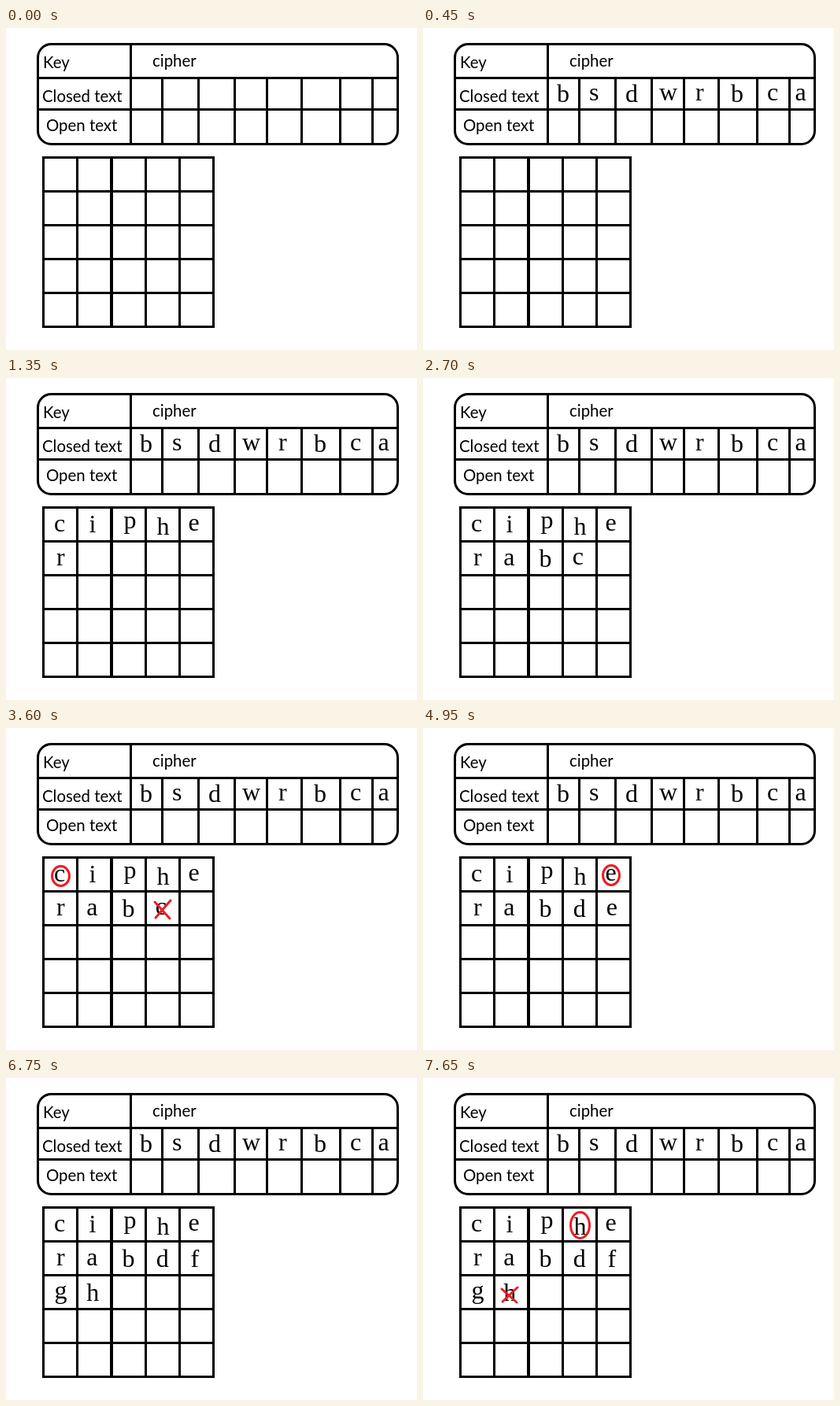
An HTML page for the animation above (8 s loop, 522 px wide and 409 px high).

```html
<!DOCTYPE html>
<html lang="en">
<head>
<meta charset="utf-8">
<title>Cipher square</title>
<style>
  html, body { margin: 0; width: 100%; height: 100%; overflow: hidden; background: #fff; }
  svg { display: block; }
  .lines { fill: none; stroke: #000; stroke-width: 3; }
  .label { font: 20.4px Lato, sans-serif; }
  .letter { font: 32px "Liberation Serif", serif; }
  .mark { fill: none; stroke: #ed1c24; stroke-width: 3; stroke-linecap: round; }
  .halo { stroke: #c3a6c0; stroke-width: 1.2; paint-order: stroke; }
</style>
</head>
<body>
<svg id="stage" width="522" height="409" viewBox="0 0 522 409"></svg>
<script>
const STEP = 450, LOOP = 8000;
const stage = document.getElementById('stage');

// Each part is visible from step `from` up to, but not including, step `to`.
function add(markup, from = 0, to = Infinity) {
  const group = document.createElementNS('http://www.w3.org/2000/svg', 'g');
  group.innerHTML = markup;
  stage.append(group);
  parts.push({ group, from, to });
}
const parts = [];

const label = (text, x, y, extra = '') =>
  `<text class="label ${extra}" x="${x}" y="${y}">${text}</text>`;
const letter = (text, x, y, from, to) =>
  add(`<text class="letter" x="${x}" y="${y}">${text}</text>`, from, to);
const circle = (x, y, rx, ry, from, to) =>
  add(`<ellipse class="mark" cx="${x}" cy="${y}" rx="${rx}" ry="${ry}"/>`, from, to);
const cross = (left, top, right, bottom, from, to) =>
  add(`<path class="mark" d="M${left} ${top + 2}L${right - 1} ${bottom}M${right} ${top}L${left + 1} ${bottom - 1}"/>`, from, to);
const vertical = (xs, top, bottom) => xs.map(x => `M${x} ${top}V${bottom}`).join('');
const horizontal = (ys, left, right) => ys.map(y => `M${left} ${y}H${right}`).join('');

// Key highlight
add('<path fill="#22b14c" d="M159 21H481Q497 22 497 38V63H159Z"/>', 2, 3);

// Table and square
add(`<g class="lines">
  <rect x="40.5" y="20.5" width="457" height="127" rx="17"/>
  <path d="${horizontal([63.5, 103.5], 40, 498)}${vertical([158.5], 20, 148)}
    ${vertical([198.5, 244.5, 290.5, 331.5, 375.5, 424.5, 465.5], 63, 148)}"/>
  <path d="${horizontal([164.5, 207.5, 250.5, 293.5, 336.5, 379.5], 46, 265)}
    ${vertical([47.5, 90.5, 177.5, 220.5, 263.5], 163, 381)}"/>
  <path stroke-width="4" d="M134 163V381"/>
</g>`);
add(label('Key', 47, 51) + label('Closed text', 46, 94) + label('Open text', 51, 131));
add(label('cipher', 186, 49, 'halo'), 2, 3);
add(label('cipher', 186, 49));

// Closed text
[['b', 170, 94], ['s', 211, 92], ['d', 257, 94], ['w', 300, 92],
 ['r', 346, 92], ['b', 391, 94], ['c', 437, 92], ['a', 472.5, 92]]
  .forEach(([text, x, y]) => letter(text, x, y, 1));

// Key word in the square
[['c', 61, 195], ['i', 105.5, 196], ['p', 149.5, 191], ['h', 191.5, 199],
 ['e', 231.5, 194], ['r', 64, 238]]
  .forEach(([text, x, y]) => letter(text, x, y, 2));

// Remaining alphabet; repeated letters are circled and crossed out
letter('a', 102.3, 238, 4);
letter('b', 147.5, 240, 5);
letter('c', 189.7, 237, 6, 9);
circle(69.5, 188, 11, 12.5, 7, 9);
cross(189, 219, 209, 242, 8, 9);
letter('d', 190.7, 240, 9);
letter('e', 232.7, 238, 10, 13);
circle(239, 187, 10.5, 12.5, 11, 13);
cross(229, 215, 253, 243, 12, 13);
letter('f', 234.5, 240, 13);
letter('g', 61.6, 280, 14);
letter('h', 102.2, 283, 15);
circle(199.5, 187, 12, 16.5, 16);
cross(100, 266, 120, 285, 17);

function draw(now) {
  const step = Math.floor(now % LOOP / STEP);
  for (const { group, from, to } of parts)
    group.style.display = step >= from && step < to ? '' : 'none';
  requestAnimationFrame(draw);
}
draw(performance.now());
</script>
</body>
</html>
```
